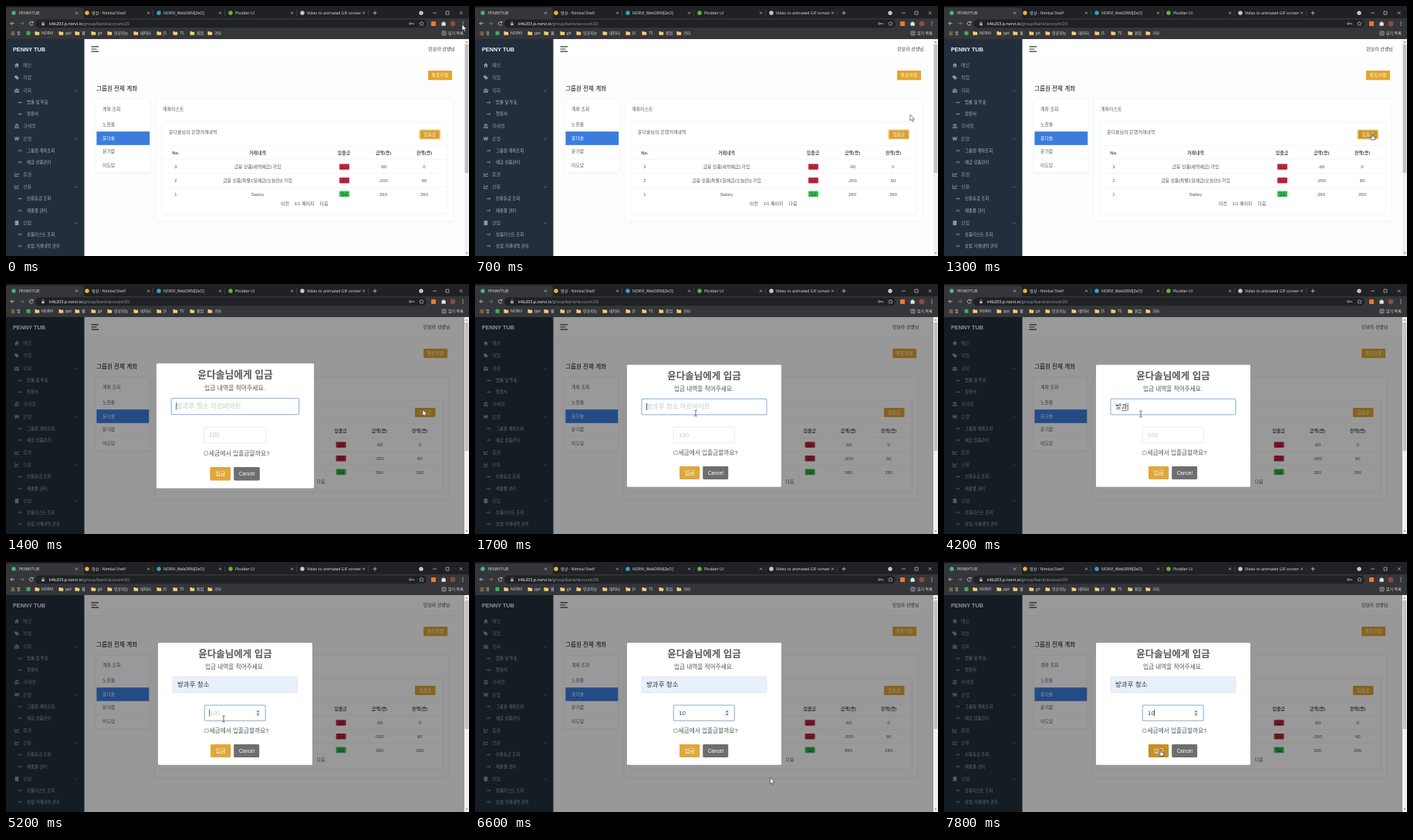
Recreate the animation shown at these times as an HTML page. Size 600x325 px, loop 8000 ms.

```html
<!DOCTYPE html>
<html lang="ko">
<head>
<meta charset="utf-8">
<title>PENNYTUB</title>
<style>
html, body { margin: 0; width: 100%; height: 100%; overflow: hidden; background: #fff; }
svg { display: block; width: 100vw; height: 100vh; }
text { font-family: "Liberation Sans", "Noto Sans CJK KR", "Noto Sans CJK", sans-serif; white-space: pre; }
.ui { font-family: "Open Sans", "Noto Sans CJK KR", "Noto Sans CJK", sans-serif; }
</style>
</head>
<body>
<svg id="stage" viewBox="0 0 600 325"></svg>
<script>
const LOOP = 8000, STEP = 100;
const stage = document.getElementById('stage');

// Drawing helpers; text is centred on y.
const rect = (x, y, w, h, fill, r = 0, more = '') =>
  `<rect x="${x}" y="${y}" width="${w}" height="${h}" rx="${r}" fill="${fill}" ${more}/>`;
const dot = (x, y, r, fill) => `<circle cx="${x}" cy="${y}" r="${r}" fill="${fill}"/>`;
const path = (d, stroke, w = .7, fill = 'none') =>
  `<path d="${d}" stroke="${stroke}" stroke-width="${w}" fill="${fill}"/>`;
const text = (x, y, s, size, fill, more = '') =>
  `<text x="${x}" y="${y + size * .36}" font-size="${size}" fill="${fill}" ${more}>${s}</text>`;
const MID = 'text-anchor="middle"', END = 'text-anchor="end"', BOLD = 'font-weight="700"', UI = 'class="ui"';
const at = (x, y, body) => `<g transform="translate(${x} ${y})">${body}</g>`;
const group = (id, body) => `<g id="${id}">${body}</g>`;

function browser() {
  const ink = '#dfe1e5', soft = '#aeb1b6';
  let s = rect(0, 0, 600, 17, '#202124') + rect(0, 16, 600, 27, '#35363a');
  s += path('M0 17V3Q0 2 2 2H98Q101 2 101 5V17Z', 'none', 0, '#35363a');
  const tabs = [
    [8, 17, 'PENNYTUB', '#41b883'],
    [103, 111, '영상 - Nimbal Shelf', '#e5b93c'],
    [196, 204, 'NORVI_WebDRM[ZeO]', '#2ba7c4'],
    [289, 297, 'Plodder UI', '#6cb52d'],
    [382, 390, 'Video to animated GIF conver', '#c9c9c9']
  ];
  tabs.forEach(([ix, tx, name, color], i) => {
    const cx = 91.5 + i * 93;
    s += dot(ix + 2, 9, 2.7, color) + text(tx, 9, name, 5.1, ink, UI);
    s += path(`M${cx - 1.5} 7.5l3 3m0 -3l-3 3`, ink, .6);
    if (i) s += path(`M${cx + 6} 5v8`, '#55585d', .5);
  });
  s += path('M475.5 9h5m-2.5 -2.5v5', ink, .7);
  s += dot(538, 9, 2.6, ink) + path('M536.8 8.5l1.2 1.2 1.2 -1.2', '#202124', .6);
  s += path('M553 9h5M570 7h4v4h-4zM587.8 7.1l3.8 3.8m0 -3.8l-3.8 3.8', ink, .6);

  s += rect(38, 17.6, 507, 10.6, '#202124', 5.3);
  s += path('M11 22.7H6m2.2 -2.2L6 22.7l2.2 2.2', ink, .7);
  s += path('M18 22.7h5m-2.2 -2.2l2.2 2.2 -2.2 2.2', '#85888d', .7);
  s += path('M34.6 21.2a2.4 2.4 0 1 0 .4 2.3M35 19.7v2h-2', ink, .7);
  s += rect(46.2, 22.3, 3.6, 3, soft, .4) + path('M47 22.3v-1a1 1 0 0 1 2 0v1', soft, .6);
  s += `<text class="ui" x="56" y="24.6" font-size="5.35" fill="#fff">k4b203.p.norvi.io<tspan fill="#9aa0a6">/group/bank/account/20</tspan></text>`;
  s += path('M525 22.8a1.2 1.2 0 1 0 0 .1h3.6v1.2', ink, .7);
  s += path('M538.5 20l.9 1.9 2 .2 -1.5 1.3 .5 2 -1.9 -1 -1.9 1 .5 -2 -1.5 -1.3 2 -.2z', ink, .5);
  s += rect(551, 20, 6, 6, '#f0792b', .8);
  s += path('M564.5 21.2h1.6a1 1 0 0 1 2 0h1.4v1.6a1 1 0 0 1 0 1.8v1.2h-5z', 'none', 0, ink);
  s += dot(579, 22.9, 3.4, '#8d4a3e');
  s += [20.7, 22.9, 25.1].map(y => dot(592, y, .6, ink)).join('');

  for (let i = 0; i < 9; i++)
    s += rect(6.4 + i % 3 * 1.8, 33.2 + (i / 3 | 0) * 1.8, 1.2, 1.2, ['#e0574b', '#e8b33f', '#5ba867'][i % 3]);
  s += text(14, 35.3, '앱', 5, ink) + rect(26.5, 32.8, 5, 5, '#38b25c', .8);
  const marks = [[46, 'NORVI'], [77, 'ppt'], [98, '웹'], [119, 'git'], [140, '인공지능'],
    [174, '데이터'], [204, 'JS'], [225, 'TS'], [247, '취업'], [270, '기타']];
  for (const [x, name] of marks) {
    s += path(`M${x - 8.5} 33h2l.7 .8h3v4h-5.7z`, 'none', 0, '#f5d06b');
    s += text(x, 35.3, name, 5, ink, UI);
  }
  s += rect(565, 33, 5, 4.8, 'none', .5, `stroke="${ink}" stroke-width=".6"`);
  s += path('M566.2 34.6h2.6m-2.6 1.6h2.6', ink, .5);
  return s + text(573, 35.3, '읽기 목록', 5, ink);
}

function scrollbar() {
  return rect(594, 43, 6, 282, '#f1f1f1') + rect(594.7, 50, 4.6, 167, '#c1c1c1') +
    path('M595.6 47.5l1.4 -1.7 1.4 1.7zM595.6 320.5l1.4 1.7 1.4 -1.7z', 'none', 0, '#6b6b6b');
}

const ICONS = {
  home: 'M-3 0L0 -3L3 0H2V3H.7V1H-.7V3H-2V0Z',
  tag: 'M-3 -2.5H0L3 .5L.5 3L-3 -.2Z',
  people: 'M-1.3 -2.5h2.6v2.2h-2.6zM-3 2.6V.5H3V2.6ZM-3 -1.5h1.2v1.4H-3zM1.8 -1.5H3v1.4H1.8z',
  bank: 'M-3 -1L0 -3L3 -1ZM-2.4 -.5h1v2.4h-1zM-.5 -.5h1v2.4h-1zM1.4 -.5h1v2.4h-1zM-3 2.2h6v.8h-6z',
  won: 'M-3 -2.4h1L-1.2 1L-.5 -2.4H.5L1.2 1L2 -2.4H3L1.8 2.5H.8L0 -.6L-.8 2.5H-1.8ZM-3.2 -.4h6.4v.7h-6.4z',
  chart: 'M-3 -2.6h.7V2H3v.7H-3zM-1.7 .8L-.4 -1.2L.6 0L2.4 -2.2L3 -1.6L.7 1.2L-.4 .1L-1.2 1.4Z',
  shop: 'M-2.3 -3h4.6v6h-4.6z'
};

function sidebar(c) {
  let s = rect(0, 43, 101.5, 282, c.side) + text(9, 56.5, 'PENNY TUB', 7.3, c.brand, BOLD);
  const items = [
    [77, '메인', 'home'], [93, '직업', 'tag'], [110, '국회', 'people', 1],
    [125.5, '법률 및 투표'], [140.5, '청원서'], [156, '국세청', 'bank'],
    [172.5, '은행', 'won', 1], [188, '그룹원 계좌조회'], [203, '예금 상품관리'],
    [219, '증권', 'chart'], [235, '신용', 'chart', 1], [250.5, '신용등급 조회'],
    [266, '제출물 관리'], [282, '상점', 'shop', 1], [297, '상품리스트 조회'], [312, '상점 거래내역 관리']
  ];
  for (const [y, name, icon, opens] of items) {
    if (icon) s += at(14, y, path(ICONS[icon], 'none', 0, c.menu)) + text(22, y, name, 6.1, c.menu);
    else s += path(`M15 ${y}h4.8m-1.5 -1.4l1.5 1.4 -1.5 1.4`, c.sub, .6) + text(27, y, name, 5.4, c.sub);
    if (opens) s += path(`M89.4 ${y - .4}l1.6 1.5 1.6 -1.5`, c.menu, .6);
  }
  return s;
}

// squeeze: how far the right edge of the content moves left.
function page(c, squeeze) {
  const sx = x => x - squeeze * (x - 117) / 462;
  const box = (x1, y, x2, h) => {
    const x = sx(x1), w = sx(x2) - x;
    const halo = d => rect(x - d, y - d + .5, w + 2 * d, h + 2 * d, c.shade, d + 1, 'opacity=".4"');
    return halo(3) + halo(2) + halo(1) + rect(x, y, w, h, c.card, 1);
  };
  const cell = (x, y, s, more = '') => text(sx(x), y, s, 5.9, c.ink, MID + ' ' + more);
  let s = rect(101, 43, 493, 282, c.bg) + rect(101, 68, 493, 2, c.shade) + rect(101, 43, 493, 26, c.card);
  s += sidebar(c);
  s += path('M110.5 52.8h9.5M110.5 56h7M110.5 59.2h9.5', c.dark, 1.2);
  s += text(sx(581.5), 56, '민보라 선생님', 5.9, c.dark, END);
  s += rect(sx(547), 84, 31, 12.3, c.gold, 1) + text(sx(547) + 15.5, 90.2, '튜토리얼', 5.8, c.onGold, MID);
  s += text(117, 107, '그룹원 전체 계좌', 7.6, c.black);

  s += box(117, 122, 186, 94) + text(125, 134, '계좌 조회', 5.9, c.ink);
  s += rect(117.4, 163.2, sx(186.2) - 117.4, 17.6, c.blue);
  ['노찬울', '윤다솔', '문기람', '이도담'].forEach((name, i) => {
    s += text(125, 154 + i * 17.6, name, 5.9, i === 1 ? c.onBlue : c.ink);
    if (i > 1) s += rect(117, 163 + i * 17.7, sx(186) - 117, .4, c.line);
  });

  s += box(195, 122, 579, 157) + text(sx(203), 134, '계좌리스트', 6, c.ink);
  s += box(203, 152, 571, 117) + text(sx(211), 163.5, '윤다솔님의 은행거래내역', 6, c.ink);
  for (const y of [181.5, 199.6, 217.6, 235.4])
    s += rect(sx(203), y, sx(571) - sx(203), .5, c.line);
  const cols = [220, 326, 438, 489, 542];
  ['No.', '거래내역', '입출금', '금액(콩)', '잔액(콩)'].forEach((h, i) => s += cell(cols[i], 190.7, h, BOLD));
  const rows = [
    ['3', '금융 상품[새싹예금] 가입', '출금', '-60', '0'],
    ['2', '금융 상품[특별1일예금(오늘만)] 가입', '출금', '-200', '60'],
    ['1', 'Salary', '입금', '260', '260']
  ];
  rows.forEach((row, r) => row.forEach((v, i) => {
    const y = 209 + r * 17.7, x = cols[i] + (i === 2 ? .5 : 0);
    if (i !== 2) return s += cell(x, y, v);
    s += rect(sx(x) - 6.5, y - 3.8, 13, 7.6, r < 2 ? c.red : c.green, 1.2);
    s += text(sx(x), y, v, 4.8, c.badge, MID);
  }));
  s += cell(361.5, 257, '이전') + cell(386.5, 257, '1/1 페이지') + cell(412, 257, '다음');
  const bx = sx(536) - (squeeze ? .3 : 0);
  const lit = squeeze ? '' : 'stroke="#f3d698" stroke-width="1.6"';
  s += `<rect ${squeeze ? '' : 'id="open"'} x="${bx}" y="161" width="26.5" height="12" rx="1" fill="${c.gold}" ${lit}/>`;
  return s + text(bx + 13.2, 167, '입출금', 5.8, c.onGold, MID);
}

const LIGHT = {
  side: '#222e3c', brand: '#f4f6f8', menu: '#8f979f', sub: '#b3b9bf', bg: '#fdfdfd', card: '#ffffff',
  shade: '#f6f7f9', line: '#eaecef', ink: '#50565d', dark: '#33383e', black: '#111111', gold: '#e0a530',
  onGold: '#ffffff', blue: '#3b7ddd', onBlue: '#ffffff', red: '#cc2743', green: '#2fc653', badge: '#4d1d26'
};
// The backdrop lays 40 % black over the page.
const shaded = hex => '#' + hex.slice(1).match(/../g)
  .map(h => Math.round(parseInt(h, 16) * .6).toString(16).padStart(2, '0')).join('');
const DIM = Object.fromEntries(Object.entries(LIGHT).map(([k, v]) => [k, shaded(v)]));

function modal() {
  let s = rect(197, 104.9, 200, 158.9, '#fff', 1.6);
  s += text(297, 119, '윤다솔님에게 입금', 12.5, '#595959', MID + ' font-weight="600"');
  s += text(296.5, 136, '입금 내역을 적어주세요.', 7.7, '#545454', MID);
  s += rect(216, 149.3, 162, 20.6, '#fff', 1.5, 'id="memo"') + text(222, 159.4, '', 8.5, '#333', 'id="memoText"');
  s += rect(230, 164, 8, .6, '#333', 0, 'id="compose"');
  s += rect(222, 155, .7, 9, '#222', 0, 'id="memoCaret"');
  s += rect(257.3, 186.2, 79, 20.2, '#fff', 1.5, 'id="sum"') + text(264, 196.2, '', 8, '#444', 'id="sumText"');
  s += group('spin', rect(323.5, 191.4, 6, 9.6, '#efefef', .3) +
    path('M325 195.2l1.5 -2 1.5 2zM325 197.4l1.5 2 1.5 -2z', 'none', 0, '#444'));
  s += rect(263.6, 191.6, .7, 9, '#222', 0, 'id="sumCaret"');
  s += rect(257.6, 217, 4.6, 4.6, '#fff', .8, 'stroke="#666" stroke-width=".6"');
  s += text(263.5, 219, '세금에서 입출금할까요?', 7.7, '#545454');
  s += rect(265, 237, 26.3, 17, '#e0a83b', 1.4, 'id="ok"') + text(278.2, 245.4, '입금', 7.1, '#fff', MID);
  s += rect(295.2, 237, 33, 17, '#6e6e70', 1.4);
  return s + text(311.8, 245.4, 'Cancel', 6.5, '#fff', MID);
}

const POINTERS = {
  arrow: path('M0 0V8L1.9 6.3L3.2 9.2L4.4 8.6L3.2 5.9H5.7Z', '#111', .5, '#fff'),
  hand: path('M-.8 .6Q0 -.4 .8 .6V3.2L3.4 3.9Q4 4.2 3.9 5L3.2 8H-.9L-3 5.2Q-2.6 4 -1.6 4.7L-.8 5.3Z', '#111', .6, '#fff'),
  beam: path('M-1.8 -3.8H-.4L0 -3.4L.4 -3.8H1.8M0 -3.4V3.4M-1.8 3.8H-.4L0 3.4L.4 3.8H1.8', '#333', .7)
};

stage.innerHTML = group('light', page(LIGHT, 0)) + group('dim', page(DIM, 6.3)) + scrollbar() + browser() +
  group('modal', modal()) +
  group('pointer', Object.keys(POINTERS).map(k => group(k, POINTERS[k])).join(''));

const $ = id => document.getElementById(id);
const show = (id, on) => $(id).setAttribute('visibility', on ? 'inherit' : 'hidden');
const set = (id, attrs) => { for (const k in attrs) $(id).setAttribute(k, attrs[k]); };
const within = (t, a, b) => t >= a && t < b;
const mix = (a, b, k) => a + (b - a) * k;

// CSS "ease" curve, solved by bisection.
function ease(p) {
  let lo = 0, hi = 1, u = p;
  for (let i = 0; i < 24; i++) {
    u = (lo + hi) / 2;
    const x = 3 * (1 - u) ** 2 * u * .25 + 3 * (1 - u) * u * u * .25 + u ** 3;
    if (x < p) lo = u; else hi = u;
  }
  return 3 * (1 - u) ** 2 * u * .1 + 3 * (1 - u) * u * u + u ** 3;
}

// Walks through [time, ...values] stops.
function follow(stops, t, curve) {
  if (t <= stops[0][0]) return stops[0].slice(1);
  for (let i = 1; i < stops.length; i++) {
    const a = stops[i - 1], b = stops[i];
    if (t < b[0]) {
      const k = curve((t - a[0]) / (b[0] - a[0]));
      return a.slice(1).map((v, j) => mix(v, b[j + 1], k));
    }
  }
  return stops[stops.length - 1].slice(1);
}

const OPEN = 1312;
const POP = [[0, .7], [135, 1.05], [240, .95], [300, 1]];
const MOVES = [
  [0, 591, 24], [900, 560, 158], [1200, 555, 166], [1300, 555, 166], [1400, 540, 163.5],
  [1700, 286, 168], [1800, 268.5, 155], [3500, 268.5, 155], [3900, 258, 175], [4200, 255, 169],
  [4400, 250, 178], [4600, 250, 178], [5000, 282, 204], [6200, 282, 204], [6500, 398, 285],
  [6900, 300, 256], [7100, 281, 244]
];
const smooth = k => k * k * (3 - 2 * k);

const HINT = '방과후 청소 아르바이트';
const TYPED = [[2600, 'ㅂ'], [2700, '바'], [2800, '방'], [2900, '방고'], [3100, '방과'], [4500, '방과후 청소']];
const SUMS = [[5600, '1'], [5700, '10']];
const latest = (list, t) => list.reduce((v, [from, s]) => t >= from ? s : v, '');

function field(id, focused, fill) {
  set(id, { fill, stroke: focused ? '#9fbde2' : '#d9dce0', 'stroke-width': focused ? 1.3 : .6 });
}

function fill(id, value, hint, ink) {
  $(id).textContent = value || hint;
  set(id, { fill: value ? ink : '#c6c6c6' });
}

function drawModal(t) {
  const scale = follow(POP, t - OPEN, ease)[0];
  set('modal', { transform: `translate(297 184.4) scale(${scale}) translate(-297 -184.4)` });

  const memo = latest(TYPED, t), sum = latest(SUMS, t);
  const chosen = t >= 4500, onSum = t >= 4900;
  field('memo', !onSum, chosen ? '#e8f0fe' : '#fff');
  fill('memoText', memo, HINT, '#333');
  show('compose', memo && !chosen);
  set('compose', { x: 222 + (memo.length - 1) * 7.8 });
  const memoX = chosen ? 264 : 222 + memo.length * 7.9;
  set('memoCaret', { x: memoX });
  show('memoCaret', !onSum && !within(t, 1900, 2400));

  field('sum', onSum, '#fff');
  fill('sumText', sum, '100', '#444');
  show('spin', onSum);
  set('sumCaret', { x: 263.4 + sum.length * 4.5 });
  show('sumCaret', onSum && !within(t, 5400, 5600) && !within(t, 6200, 6700) && !within(t, 7200, 7800));
  set('ok', { fill: t >= 7500 ? '#c58f27' : t >= 7100 ? '#d09a31' : '#e0a83b' });
}

function drawPointer(t, opened) {
  const [x, y] = follow(MOVES, t, smooth);
  const over = (x1, y1, x2, y2) => x >= x1 && x <= x2 && y >= y1 && y <= y2;
  let kind = 'arrow';
  if (opened) {
    if (over(216, 149, 378, 170) || over(257, 186, 323, 207)) kind = 'beam';
    else if (over(265, 237, 291, 254)) kind = 'hand';
  } else if (over(536, 161, 563, 173)) kind = 'hand';
  for (const k in POINTERS) show(k, k === kind);
  set('pointer', { transform: `translate(${x} ${y})` });
  show('pointer', !within(t, 2100, 3500) && !within(t, 5600, 6200));
  set('open', { fill: kind === 'hand' && !opened ? '#cb9326' : '#d89f2d' });
}

function draw(time) {
  const t = Math.floor(time % LOOP / STEP) * STEP;
  const opened = t >= OPEN;
  show('light', !opened);
  show('dim', opened);
  $('modal').style.display = opened ? '' : 'none';
  if (opened) drawModal(t);
  drawPointer(t, opened);
}

const start = performance.now();
function tick() {
  draw(performance.now() - start);
  requestAnimationFrame(tick);
}
tick();
</script>
</body>
</html>
```
